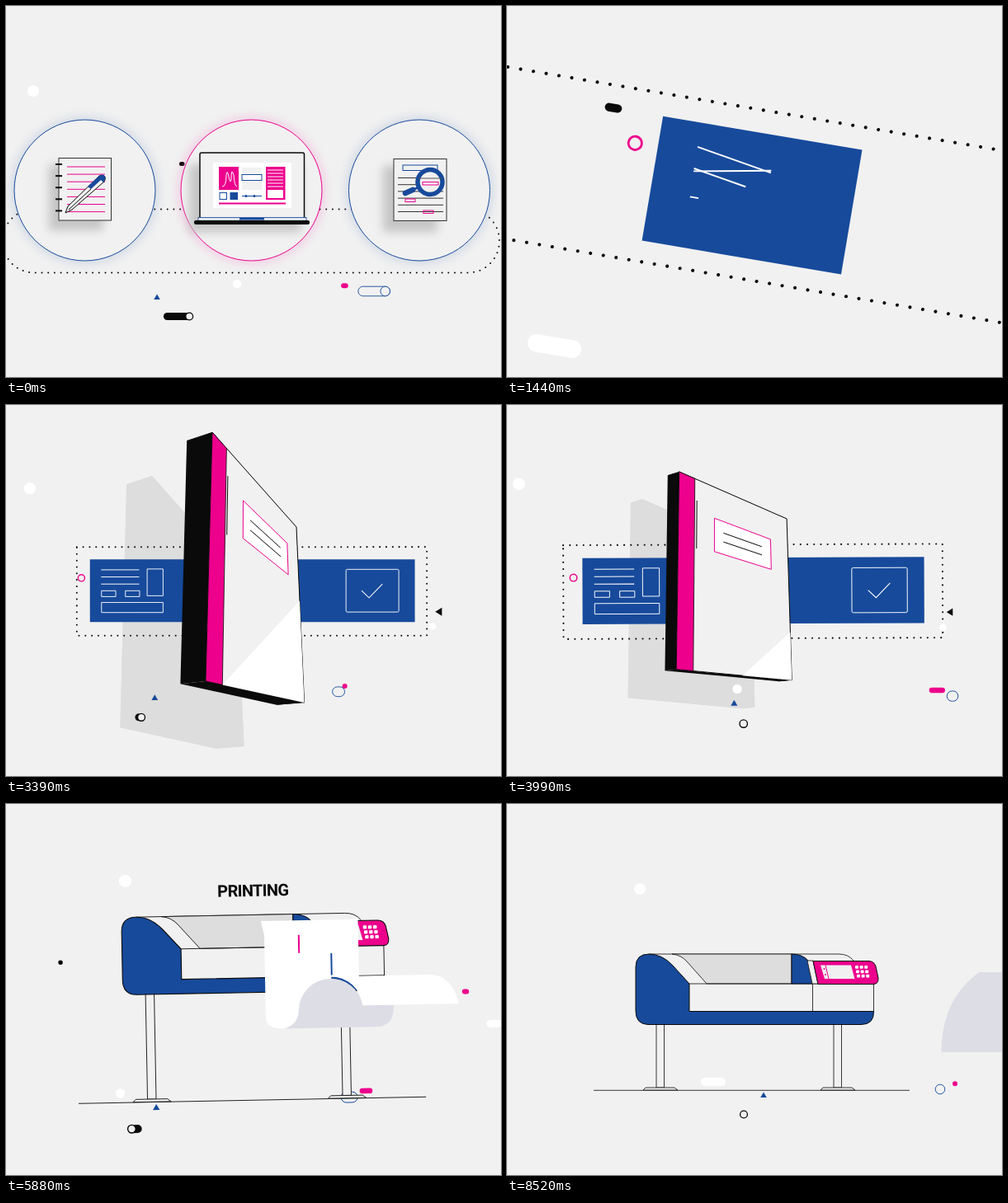
Recreate the animation shown at these times as an HTML page. Size 600x450 px, loop 8550 ms.

```html
<!DOCTYPE html>
<html lang="en">
<head>
<meta charset="utf-8">
<title>Printing</title>
<style>
html,body{margin:0;width:100%;height:100%;overflow:hidden;background:#f1f1f1}
svg{display:block;width:100vw;height:100vh}
text{font:700 18.2px Roboto,"Open Sans",sans-serif;letter-spacing:-.6px;text-anchor:middle}
.thin{fill:none;stroke:#222;stroke-width:.9}
.paper{fill:#f1f1f1;stroke:#222;stroke-width:.9}
</style>
</head>
<body>
<svg viewBox="0 0 600 450">
<defs>
  <filter id="soft" x="-40%" y="-40%" width="180%" height="180%"><feGaussianBlur stdDeviation="6"/></filter>
  <clipPath id="gate"><rect x="79" y="-100" width="900" height="700"/></clipPath>
</defs>
<g id="shadow"></g>
<g id="camera">
  <g id="dots" fill="none" stroke="#0a0a0a" stroke-width="2" stroke-linecap="round" stroke-dasharray="0 7.7"></g>
  <g id="bits"></g>
  <g id="icons"></g>
  <g clip-path="url(#gate)"><g id="band"></g></g>
  <path id="ground" class="thin"/>
  <g clip-path="url(#gate)">
    <g id="printer">
      <g id="legs"></g>
      <g id="body"></g>
    </g>
  </g>
  <text id="title" x="301.5" fill="#0a0a0a">PRINTING</text>
</g>
<g id="book"></g>
</svg>
<script>
const LOOP = 8550, SWAY = 3625, BLUE = '#174a9b', PINK = '#ec008c', INK = '#0a0a0a', BG = '#f1f1f1', LILAC = '#dddde6';
const $ = id => document.getElementById(id);
const lerp = (a, b, p) => a + (b - a) * p;
const seg = (t, a, b) => Math.min(1, Math.max(0, (t - a) / (b - a)));
const ease = (t, a, b) => { const p = seg(t, a, b); return p * p * (3 - 2 * p); };
const quad = p => p < .5 ? 2 * p * p : 1 - 2 * (1 - p) ** 2;
const back = p => 1 + 2.2 * (p - 1) ** 3 + 1.2 * (p - 1) ** 2;
const within = (t, a, b) => t >= a && t < b;
// up during a..b, down again during c..d
const bump = (t, a, b, c, d) => ease(t, a, b) - ease(t, c, d);

const rect = (x, y, w, h, attrs) => `<rect x="${x}" y="${y}" width="${Math.max(0, w)}" height="${Math.max(0, h)}" ${attrs}/>`;
const line = (x1, y1, x2, y2, color, w = 1) => `<path d="M${x1} ${y1}L${x2} ${y2}" stroke="${color}" stroke-width="${w}" fill="none"/>`;
const disc = (x, y, r, color) => `<circle cx="${x}" cy="${y}" r="${r}" fill="${color}"/>`;
const ring = (x, y, r, color, w, fill = 'none') => `<circle cx="${x}" cy="${y}" r="${r}" fill="${fill}" stroke="${color}" stroke-width="${w}"/>`;
const poly = (pts, attrs) => `<polygon points="${pts.map(p => p.join()).join(' ')}" ${attrs}/>`;
const fill = c => `fill="${c}"`;
const outline = (c, w = 1, f = 'none') => `fill="${f}" stroke="${c}" stroke-width="${w}"`;
const rows = (n, y, step, draw) => Array.from({length: n}, (_, i) => draw(y + i * step, i)).join('');
const blur = (x, y, w, h) => rect(x, y, w, h, 'fill="#c4c4c4" filter="url(#soft)"');

function notepad() {
  return blur(52, 192, 66, 80) + rect(64, 184.5, 63.5, 75.5, outline('#333', 1, BG)) +
    rows(7, 195, 9.1, y => line(74, y, 120, y, PINK)) +
    rows(5, 192, 14.1, y => line(60, y, 68, y, INK, 2)) +
    `<path d="M72 251L75 243 113 206Q118 204 120 207 121 210 119 213L80 247Z" ${outline(INK, 1, BG)}/>
     <path d="M99 219L113 206Q118 203 120 207 121 210 118 214L115 211 103 222Z" fill="${BLUE}"/>` + line(76, 247, 103, 222, INK);
}
function laptop() {
  return blur(222, 192, 136, 82) +
    rect(235, 178, 126.5, 80, outline(INK, 1.5, BG) + ' rx="2"') + rect(251, 190, 95, 55, fill('#fff')) +
    rect(258, 195, 24, 28, fill(PINK)) +
    '<path d="M262 219Q267 219 267 205 268 197 270 207T273 210Q273 195 276 205 277 219 280 219" fill="none" stroke="#fff"/>' +
    rect(286, 196, 24, 27, fill(BG)) + rect(286, 204.5, 24, 7, outline(BLUE, 1, '#fff')) +
    rect(315, 195, 23.5, 40, fill(PINK)) + rows(6, 199, 4, y => line(317, y, 336, y, '#fff')) + rect(317, 223, 19, 10, fill('#fff')) +
    rect(259, 226.5, 8.5, 8, outline(BLUE)) + rect(271.5, 226, 9.5, 9, fill(BLUE)) +
    line(286, 230.5, 310, 230.5, BLUE) + disc(291, 230.5, 1.6, BLUE) + disc(301, 230.5, 1.6, BLUE) +
    line(258, 239.5, 339, 239.5, PINK, 2) + rect(233, 256.5, 131, 4, outline(BLUE, .8, '#dde3ef')) +
    rect(283, 257, 30, 2.5, fill(BLUE)) + rect(228, 260, 140, 5, fill(INK) + ' rx="2"');
}
function report() {
  return blur(457, 194, 66, 80) + rect(470, 185.5, 64, 75, outline('#333', 1, BG)) +
    rect(481, 193, 42, 6.5, outline(BLUE)) + rows(6, 208.5, 8.2, y => line(475, y, 530, y, '#333')) +
    rect(484, 234, 12, 3.5, outline(PINK)) + rect(506, 248, 12, 3.5, outline(PINK)) +
    ring(514, 213.5, 15, BLUE, 5.5, BG) + line(500, 209, 529, 209, '#555') + rect(505, 213.5, 19, 3.5, outline(PINK)) +
    `<path d="M484 227L493 223" stroke="${BLUE}" stroke-width="6.5" stroke-linecap="round"/>` + line(493, 223, 502, 219, BLUE, 3);
}
const badges = [[95.5, BLUE, notepad], [297.5, PINK, laptop], [501, BLUE, report]];
$('icons').innerHTML = badges.map(([x, color, art]) =>
  `<g><circle cx="${x}" cy="223.5" r="90" fill="${color}" opacity=".13" filter="url(#soft)"/>${ring(x, 223.5, 85.5, color, 1, BG)}${art()}</g>`).join('');

const buttons = rows(3, 196, 5.4, (y, j) => rows(3, 422, 5.6, x => rect(x + j, y, 4, 3.8, 'rx="1" fill="#fff"')));
$('body').innerHTML = `
  <path fill="${BG}" d="M172 182H402Q414 182 420 190L444 218V254Q444 267 430 267H170Q156 267 156 252V198Q156 182 172 182Z"/>
  <path class="thin" d="M172 182H402Q414 182 420 190M444.5 218V252"/>
  <path d="M200 182H345V218H242L218 191Q211 183 200 182Z" fill="#dddddd" stroke="#222" stroke-width=".9"/>
  <path d="M172 182Q188 182 201 196L221 218V251.5H444.5Q445 267.5 429 267.5H171Q156 267 156 251V198Q156 182 172 182Z" fill="${BLUE}" stroke="${INK}"/>
  <path class="thin" d="M221 218H444.5M370.5 218V251"/>
  <path d="M345 182Q358 182 365 190L370 218H345Z" fill="${BLUE}" stroke="${INK}"/>
  <path class="paper" d="M364 190H371L377 218H370Z"/>
  <path d="M371 190.5H438Q445 190.5 447 197L450 211Q450.5 218.5 444 218.5H377Z" fill="${PINK}" stroke="${INK}"/>
  <path d="M380 195.5H417L421.5 212H385Z" fill="${BG}"/><path d="M386 195.5L390 212" stroke="${PINK}"/>
  ${disc(384.5, 200, 1, PINK)}${disc(386, 207, 1, PINK)}${buttons}<g id="sheet"></g>`;

function drawDots(t) {
  const m = ease(t, 250, 1000), settle = ease(t, 1450, 2400), w = ease(t, 3500, 4700);
  const top = lerp(246.5, 178, m) - 5 * settle;
  if (t < 1500) {
    $('dots').innerHTML = rect(lerp(-4, 89, m), top, lerp(602, 418, m), lerp(323.5, 279, m) - top, `rx="${lerp(38, 0, m)}"`);
    return;
  }
  const l = lerp(89, 72.5, w), r = lerp(507, 525, w), b = 279 + 1.5 * w;
  const c = [[l, top], [r, top], [r, b], [l, b], [l, top]];
  // the outline is wiped away clockwise from its top left corner
  let gap = 1130 * seg(t, 4530, 5400) ** 2, d = '';
  for (let i = 0; i < 4; i++) {
    const [x1, y1] = c[i], [x2, y2] = c[i + 1], len = Math.hypot(x2 - x1, y2 - y1);
    if (gap >= len) { gap -= len; continue; }
    d = d || `M${lerp(x1, x2, gap / len)} ${lerp(y1, y2, gap / len)}`;
    d += `L${x2} ${y2}`;
    gap = 0;
  }
  $('dots').innerHTML = `<path d="${d}"/>`;
}

function drawIcons(t) {
  [...$('icons').children].forEach((g, i) => {
    const s = 1 - ease(t, 180 + i * 70, 620 + i * 70), x = badges[i][0];
    g.setAttribute('transform', `translate(${x} 223.5) scale(${s}) translate(${-x} -223.5)`);
    g.style.display = s > 0 ? '' : 'none';
  });
}

function drawBand(t, slide) {
  if (t < 700 || slide >= 1) { $('band').innerHTML = ''; return; }
  const spread = ease(t, 1650, 2500), half = 60 * ease(t, 700, 1100) + 134 * spread, h = 75 * ease(t, 700, 1050);
  const fold = 1 - ease(t, 1440, 2050), y = lerp(229, 225.3, spread), check = ease(t, 1800, 2500);
  const drawn = start => `pathLength="1" stroke-dasharray="${ease(t, start, start + 500)} 2"`;
  const frame = (x, y, w, h, start) => `<path d="M${x} ${y + h}h${w}v${-h}h${-w}z" ${outline('#fff', .9)} ${drawn(start)}/>`;
  // three text lines unfold from a zigzag
  const text = rows(3, -25, 8.5, (y, i) => {
    const p = seg(t, 1000 + 150 * i, 1200 + 150 * i), tilt = (i === 1 ? -4 : 4) * fold, mid = y + (i === 2 ? 2 : 6) * fold * (i === 1 ? .7 : 1);
    return p ? line(-38, mid - tilt, -38 + 45.5 * p, lerp(mid - tilt, mid + tilt, p), '#fff', .95) : '';
  });
  $('band').innerHTML = `<g transform="translate(${-400 * slide} ${y})">` + rect(298.7 - half, -h / 2, half * 2, h, fill(BLUE)) +
    `<g transform="translate(${lerp(300, 156, spread) + 120 * slide} 0)">${text}` +
    frame(-37.5, 0, 17, 7, 1340) + frame(-9, 0, 17, 7, 1550) + frame(17, -26, 19, 32, 1500) + frame(-37.5, 14, 73.5, 12, 1600) + '</g>' +
    (check ? `<g transform="translate(${lerp(300, 442, check)} 0) scale(${check})">` + rect(-31.5, -25.5, 63, 51, outline('#fff', .9) + ' rx="1.5"') +
    `<path d="M-13 0L-4 8.5 12-8" ${outline('#fff')} ${drawn(2300)}/></g>` : '') + '</g>';
}

// the small bits all swing between two places in a common rhythm
const beat = t => (t + 600) % SWAY - 600;
function sway(t, from, to, out, home) {
  const u = beat(t);
  return lerp(from, to, bump(u, out, out + 600, home, home + 600));
}
function drawBits(t) {
  const trail = (lag, ...path) => {
    const head = sway(t, ...path), tail = sway(t - lag, ...path);
    return {head, left: Math.min(head, tail), length: Math.abs(head - tail)};
  };
  const pill = (tr, y, r, attrs) => rect(tr.left - r, y - r, tr.length + 2 * r, 2 * r, `rx="${r}" ${attrs}`);
  const u = beat(t), hoop = trail(90, 163, 287, -290, 1650), sky = trail(90, 400, 525, -290, 1650);
  const tri = sway(t, 182, 311, -30, 1750), wedge = 1 - bump(u, 300, 600, 2400, 2700), spot = bump(u, 500, 800, 2400, 2700);
  $('bits').innerHTML =
    pill(trail(50, 33, 161, 450, 2400), 103, 7, fill('#fff')) +
    pill(trail(70, 280, 151, 1050, 2400), 337, 5.3, fill('#fff')) +
    pill(trail(50, 514, 590, 700, 2000), 268, 4.2, fill('#fff')) +
    pill(trail(40, 409, 543, -50, 1750), 339.3, 3, fill(PINK)) +
    pill(trail(40, 88, 214, -600, 1350), 191.5, 2.5, fill(INK)) +
    pill(trail(60, 531, 554, 500, 1750), 232, 2.7 * spot, fill(PINK)) +
    (within(u, 900, 1400) ? line(545, 249.5, 558, 249.5, PINK) : '') +
    poly([[tri - 3.8, 356], [tri, 349.5], [tri + 3.8, 356]], fill(BLUE)) +
    poly([[525 - 8 * wedge, 250.5], [525, 250.5 - 5 * wedge], [525, 250.5 + 5 * wedge]], fill(INK)) +
    ring(sway(t, 94.5, 225, 450, 2000), 210, 4, PINK, 1.4) +
    (hoop.length > 1.5 ? pill(hoop, 376.5, 4.5, fill(INK)) : '') + ring(hoop.head, 376.5, 4.4, INK, 1.3, BG) +
    pill(sky, 346, 5.8, outline(BLUE, .9)) + (sky.length > 20 ? ring(sky.head, 346, 5.8, BLUE, .9, BG) : '');
}

function firstSheet(t) {
  const drop = ease(t, 5450, 5760), curl = ease(t, 5640, 5860), out = 420 * seg(t, 6400, 6950) ** 2;
  const bottom = 189 + 119 * drop, end = 384 + 111 * ease(t, 5640, 5880) + 25 * ease(t, 5880, 6400);
  const a = ease(t, 5680, 5880), b = ease(t, 5740, 5900);
  return `<g transform="translate(${out} 0)">
    <path d="M309.5 189H416.5V${lerp(bottom, 252, curl)}H386V${lerp(bottom, 287, curl)}H350Q349 ${bottom} 332 ${bottom}Q313 ${bottom} 313 ${bottom - 12 * drop}V205Z" fill="#fff"/>
    <g opacity="${curl}"><path d="M332 308Q349 305 349.5 287A35.5 35.5 0 0 1 420 284H454Q455 308 434 308Z" fill="${LILAC}"/>
    <path d="M385 251.5H${end}Q${end + 24} 253 ${end + 31} 284H420A35.5 35.5 0 0 0 385 251.5Z" fill="#fff"/></g>
    ${line(351, 205, 351, 205 + 20 * a, PINK, 1.8)}${line(386.5, 226, 386.5, 226 + 25 * b, BLUE, 1.8)}</g>`;
}
function secondSheet(t) {
  const bottom = 189 + 107 * ease(t, 6980, 7320), roll = 218 * ease(t, 7850, 8580), x = 312.5 + roll, w = Math.min(220, roll * 1.3);
  return (x < 417 ? `<path d="M${x - 2.5} 187H417V${bottom}H${x}V203Z" fill="#fff"/>` : '') +
    `<path d="M${x} 301Q${x} 237 ${x + Math.min(46, w)} 204H${x + w}V301Z" fill="${LILAC}"/>`;
}

function drawPrinter(t, slide) {
  const shown = t > 4500, dy = -39 * bump(t, 5300, 5700, 6700, 7200) + 2.5 * bump(t, 6900, 7200, 7400, 7800);
  const grow = ease(t, 5200, 5650), base = lerp(266, 347, grow), hip = 267 + dy;
  $('printer').style.display = shown ? '' : 'none';
  $('printer').setAttribute('transform', `translate(${-377 * (1 - slide)} 0)`);
  $('body').setAttribute('transform', `translate(0 ${dy})`);
  $('legs').innerHTML = grow ? [165, 380].map(x =>
    `<path class="paper" d="M${x + 16} ${hip}V${base - 3}h9.5V${hip}"/><path class="paper" d="M${x} ${base}l3-3h35l4 3Z"/>`).join('') : '';
  $('ground').setAttribute('d', shown ? `M105 347.3h${383 * seg(t, 4580, 5450) ** 1.7}` : '');
  $('title').style.display = within(t, 5450, 7200) ? '' : 'none';
  $('title').setAttribute('y', lerp(5, 122.5, ease(t, 5450, 5780)));
  $('title').setAttribute('opacity', 1 - seg(t, 7000, 7200));
  $('sheet').innerHTML = within(t, 5450, 6980) ? firstSheet(t) : t >= 6980 ? secondSheet(t) : '';
}

// cover corners clockwise from the top left, first turned away, then facing
const turned = [[250, 33], [352, 148], [361.5, 361], [242, 335]];
const facing = [[165, 131.5], [325.5, 127.5], [328, 305], [166.5, 305.5]];
function drawBook(t) {
  if (!within(t, 2600, 5560)) { $('book').innerHTML = $('shadow').innerHTML = ''; return; }
  const m = ease(t, 3500, 4500), size = back(seg(t, 2600, 3150)), lift = -420 * seg(t, 4950, 5550) ** 3;
  const blend = (a, b) => a.map((v, k) => lerp(v, b[k], m));
  const cover = turned.map((p, i) => blend(p, facing[i]));
  const depth = blend([-32, 6.5], [3, -.5]), shrink = lerp(.977, 1, m);
  const rear = cover.map(([x, y]) => [302 + (x - 302) * shrink + depth[0], 194 + (y - 194) * shrink + depth[1]]);
  const grown = ([x, y]) => [lerp(285, x, size), lerp(215, y, size) + lift];
  const f = cover.map(grown), r = rear.map(grown);
  const at = (u, v) => [0, 1].map(k => lerp(lerp(f[0][k], f[1][k], u), lerp(f[3][k], f[2][k], u), v));
  const patch = (u0, v0, u1, v1, attrs) => poly([at(u0, v0), at(u1, v0), at(u1, v1), at(u0, v1)], attrs);
  const rule = (u0, v0, u1, v1) => line(...at(u0, v0), ...at(u1, v1), INK);
  const sides = f.map((p, i) => { const j = (i + 1) % 4; return [p, f[j], r[j], r[i]]; });
  const [dx, dy] = blend([-73, 53], [-15, 12]);
  $('shadow').innerHTML = `<g transform="translate(${dx * size} ${dy * size})" fill="#dddddd">${[f, r, ...sides].map(q => poly(q, '')).join('')}</g>`;
  const spine = lerp(.17, .122, m), shine = lerp(.42, 1, m);
  const [u0, u1, v0, v1] = blend([.37, .88, .15, .32], [.285, .805, .185, .375]);
  const textRow = p => rule(lerp(u0, u1, .16), lerp(v0, v1, p), lerp(u0, u1, .84), lerp(v0, v1, p));
  $('book').innerHTML = sides.map(q => poly(q, fill(INK))).join('') + poly(f, outline(INK, 1, BG)) +
    poly([at(1, shine), at(1, 1), at(lerp(.17, 1, m), 1)], fill('#fff')) +
    patch(0, 0, spine, 1, outline(INK, .8, PINK)) + rule(spine + .02, .11, spine + .02, .36) +
    patch(u0, v0, u1, v1, outline(PINK, 1, '#fff') + ' stroke-linejoin="round"') + textRow(.35) + textRow(.62);
}

function draw(t) {
  const near = bump(t, 250, 1250, 1550, 2600);
  const zoom = 1 + 1.04 * near + .1 * bump(t, 3000, 4600, 6100, 8520);
  const turn = 9.6 * near - 1.1 * bump(t, 3200, 6000, 6000, 7250);
  $('camera').setAttribute('transform', `translate(300 228) rotate(${turn}) scale(${zoom}) translate(-300 -228)`);
  const slide = quad(seg(t, 4580, 5360));
  drawDots(t);
  drawIcons(t);
  drawBand(t, slide);
  drawBits(t);
  drawPrinter(t, slide);
  drawBook(t);
}

const start = performance.now();
function tick() {
  draw((performance.now() - start) % LOOP);
  requestAnimationFrame(tick);
}
tick();
</script>
</body>
</html>
```
